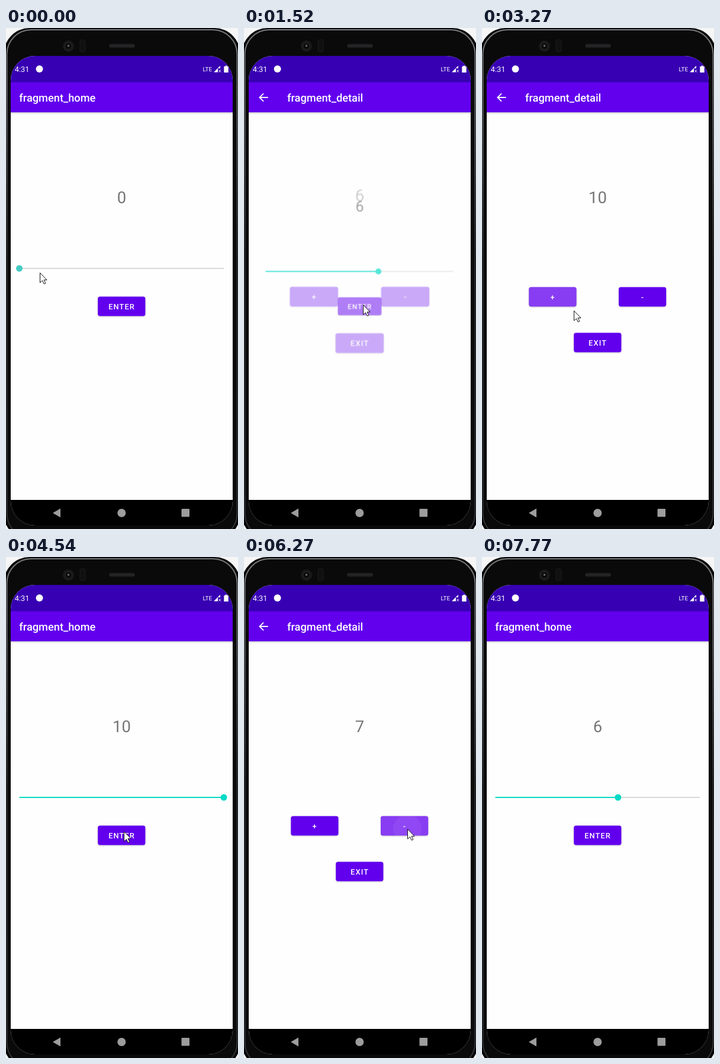
An HTML page for the animation above (8410 ms loop, 392 px wide and 844 px high).

```html
<!DOCTYPE html>
<html lang="en">
<head>
<meta charset="utf-8">
<title>Fragment navigation</title>
<style>
  html, body { margin: 0; width: 100%; height: 100%; overflow: hidden; background: #f6f6f6; }
  svg { display: block; }
  text { font-family: Roboto, sans-serif; fill: #fff; text-rendering: geometricPrecision; }
  .title { font-size: 18.24px; font-weight: 500; }
  .label { font-size: 12.77px; font-weight: 500; letter-spacing: .0893em; text-anchor: middle; }
  .number { font-size: 27.4px; fill: #757575; text-anchor: middle; }
</style>
</head>
<body>
<svg id="stage" width="392" height="844" viewBox="0 0 392 844"></svg>
<script>
const LOOP = 8410, STEP = 79.34;
const FADE_STEPS = 3;
const TRACK_LEFT = 22.5, NOTCH = 34.55, PIVOT = [195.5, 468];

const buttons = {
  plus: [79.3, 436.4, '+'],
  minus: [231, 436.4, '-'],
  exit: [155.2, 513.4, 'EXIT'],
  enter: [155.2, 452.4, 'ENTER']
};

function button(id) {
  const [x, y, label] = buttons[id];
  const box = `x="${x}" y="${y}" width="80.2" height="32.8" rx="3.6"`;
  return `<rect ${box} fill="#6200ee" filter="url(#lift)"/>
    <clipPath id="${id}Clip"><rect ${box}/></clipPath>
    <g id="${id}" clip-path="url(#${id}Clip)" fill="#fff">
      <rect ${box} opacity=".24"/><circle r="24" opacity=".06"/>
    </g>
    <text class="label" x="${x + 40.4}" y="${y + 21.1}">${label}</text>`;
}

document.getElementById('stage').innerHTML = `
  <defs>
    <filter id="lift" x="-10%" y="-20%" width="120%" height="150%">
      <feDropShadow dx="0" dy="1" stdDeviation=".8" flood-opacity=".25"/>
    </filter>
    <linearGradient id="rim" x2="0" y2="1">
      <stop offset="0" stop-color="#77797b"/><stop offset=".12" stop-color="#6c6e70"/>
      <stop offset=".45" stop-color="#2c2d2e"/><stop offset="1" stop-color="#303133"/>
    </linearGradient>
    <linearGradient id="shade" x2="0" y2="1">
      <stop offset="0" stop-opacity=".2"/><stop offset="1" stop-opacity="0"/>
    </linearGradient>
    <clipPath id="screen"><rect x="8" y="47" width="375" height="791" rx="41"/></clipPath>
  </defs>

  <rect x="-4" width="400" height="862" rx="44" fill="#050505"/>
  <rect x="1.5" y="3" width="389" height="856" rx="41" fill="#0a0a0b" stroke="url(#rim)" stroke-width="2"/>
  <circle cx="105.5" cy="30.5" r="9.5" fill="#19191a"/>
  <circle cx="105.5" cy="30.5" r="5.5" fill="#0a0a0b" stroke="#29292b"/>
  <circle cx="105.5" cy="30" r="1.8" fill="#68696d"/>
  <rect x="125" y="20" width="9" height="20" rx="3" fill="#101011" stroke="#1c1c1d"/>
  <rect x="174.5" y="27" width="43" height="6" rx="2.5" fill="#242425" stroke="#171718"/>

  <g clip-path="url(#screen)">
    <rect x="8" y="47" width="375" height="791" fill="#fefefe"/>
    <g id="detail">
      <text class="number" x="195.5" y="294.8"></text>
      ${['plus', 'minus', 'exit'].map(button).join('')}
    </g>
    <g id="home">
      <text class="number" x="195.5" y="294.8"></text>
      <path d="M22.5 405H368" stroke="#d9d9d9" stroke-width="1.8"/>
      <path id="progress" stroke="#03dac5" stroke-width="2"/>
      <circle id="thumb" cy="405" r="5.5"/>
      ${button('enter')}
    </g>

    <rect x="8" y="47" width="375" height="45" fill="#3700b3"/>
    <rect x="8" y="91.5" width="375" height="50.5" fill="#6200ee"/>
    <rect x="8" y="142" width="375" height="3.5" fill="url(#shade)"/>
    <text x="14.8" y="74" font-size="12.77">4:31</text>
    <circle cx="56.5" cy="69" r="6" fill="#fff"/>
    <text x="332.5" y="73" font-size="10">LTE</text>
    <path d="M351 74.5L362 63.5V68H358V74.5Z" fill="#fff"/>
    <path d="M359.5 70.5l3.5 4m0-4l-3.5 4" stroke="#fff"/>
    <path d="M370.5 63.5h3v1.2h2.2v10.3h-7.4v-10.3h2.2z" fill="#fff"/>
    <path id="back" d="M40.5 117H26.5M33 110.3L26.3 117L33 123.7" fill="none" stroke="#fff" stroke-width="1.8"/>
    <text id="title" class="title" y="124"></text>

    <rect x="8" y="795" width="375" height="43"/>
    <g fill="#9d9d9d">
      <path d="M79 817L92 809.5V824.5Z"/>
      <circle cx="195.3" cy="817" r="7"/>
      <rect x="296.5" y="810" width="13.5" height="13.5" rx="1"/>
    </g>
  </g>
  <path id="cursor" d="M.5 .5V17L4.5 13.5L7.2 19.2L9.8 18L7.1 12.4H12Z"
    fill="#fff" stroke="#111" stroke-linejoin="round"/>`;

const $ = id => document.getElementById(id);
const numbers = document.querySelectorAll('.number');

const set = (el, attrs) => {
  for (const key in attrs) el.setAttribute(key, attrs[key]);
};

// Pointer path: step, x, y
const path = [
  [0, 57, 412], [2, 33, 406], [4, 33, 406], [10, 232, 408], [11, 231, 412],
  [14, 201, 461], [15, 201, 466], [21, 201, 466], [25, 213, 476], [28, 207, 484],
  [31, 140, 455], [39, 140, 455], [41, 155, 476], [46, 206, 531], [51, 206, 531],
  [54, 246, 498], [57, 199, 462], [71, 199, 462], [74, 276, 458], [80, 276, 458],
  [82, 250, 515], [85, 205, 538], [90, 205, 538], [98, 368, 868], [Infinity, 368, 868]
];
const presses = [
  ['enter', 16, 20], ['plus', 32, 42], ['exit', 46, 50],
  ['enter', 65, 69], ['minus', 74, 83], ['exit', 87, 89]
];
const adds = [33, 35, 37, 39], subtracts = [75, 77, 79, 81];
const changes = [18, 47, 67, 86]; // open, close, open, close

function pointer(n) {
  const i = path.findIndex(key => key[0] > n);
  const [a, x, y] = path[i - 1], [b, u, v] = path[i];
  const p = (n - a) / (b - a);
  return [Math.round(x + (u - x) * p), Math.round(y + (v - y) * p)];
}

function valueAt(n, x) {
  if (n < 4) return 0;
  if (n < 12) return Math.round((x - TRACK_LEFT) / NOTCH);
  const passed = list => list.filter(step => step <= n).length;
  return 6 + passed(adds) - passed(subtracts);
}

function place(id, scale, opacity) {
  const [x, y] = PIVOT;
  set($(id), {
    transform: `translate(${x} ${y}) scale(${scale}) translate(${-x} ${-y})`,
    opacity,
    visibility: opacity > 0 ? 'visible' : 'hidden'
  });
}

function draw(time) {
  const n = Math.floor((time % LOOP + 12) / STEP);
  const [x, y] = pointer(n);
  const value = valueAt(n, x);

  const count = changes.filter(step => step < n).length;
  const opened = count % 2 === 1;
  const p = count ? Math.min((n - changes[count - 1]) / FADE_STEPS, 1) : 1;
  const eased = 1 - (1 - p) ** 5;
  if (opened) {
    place('home', 1 - .093 * eased, 1 - p);
    place('detail', 1.125 - .125 * eased, p);
  } else {
    place('home', .925 + .075 * eased, p);
    place('detail', 1 + .075 * eased, 1 - p);
  }

  $('title').textContent = opened ? 'fragment_detail' : 'fragment_home';
  set($('title'), { x: opened ? 73 : 22.3 });
  set($('back'), { opacity: opened ? 1 : 0 });

  for (const number of numbers) number.textContent = value;
  const thumbX = TRACK_LEFT + value * NOTCH;
  set($('progress'), { d: `M${TRACK_LEFT} 405H${thumbX}` });
  set($('thumb'), { cx: thumbX, fill: value ? '#03dac5' : '#45cbc3' });

  for (const id in buttons) {
    const pressed = presses.some(([name, from, to]) => name === id && n >= from && n <= to);
    set($(id), { opacity: pressed ? 1 : 0 });
    const ripple = y < 470 && id !== 'enter' ? 24 : 0;
    set($(id).querySelector('circle'), { cx: x, cy: y, r: ripple });
  }
  set($('cursor'), { transform: `translate(${x} ${y})` });
}

function tick() {
  draw(performance.now());
  requestAnimationFrame(tick);
}
tick();
</script>
</body>
</html>
```
